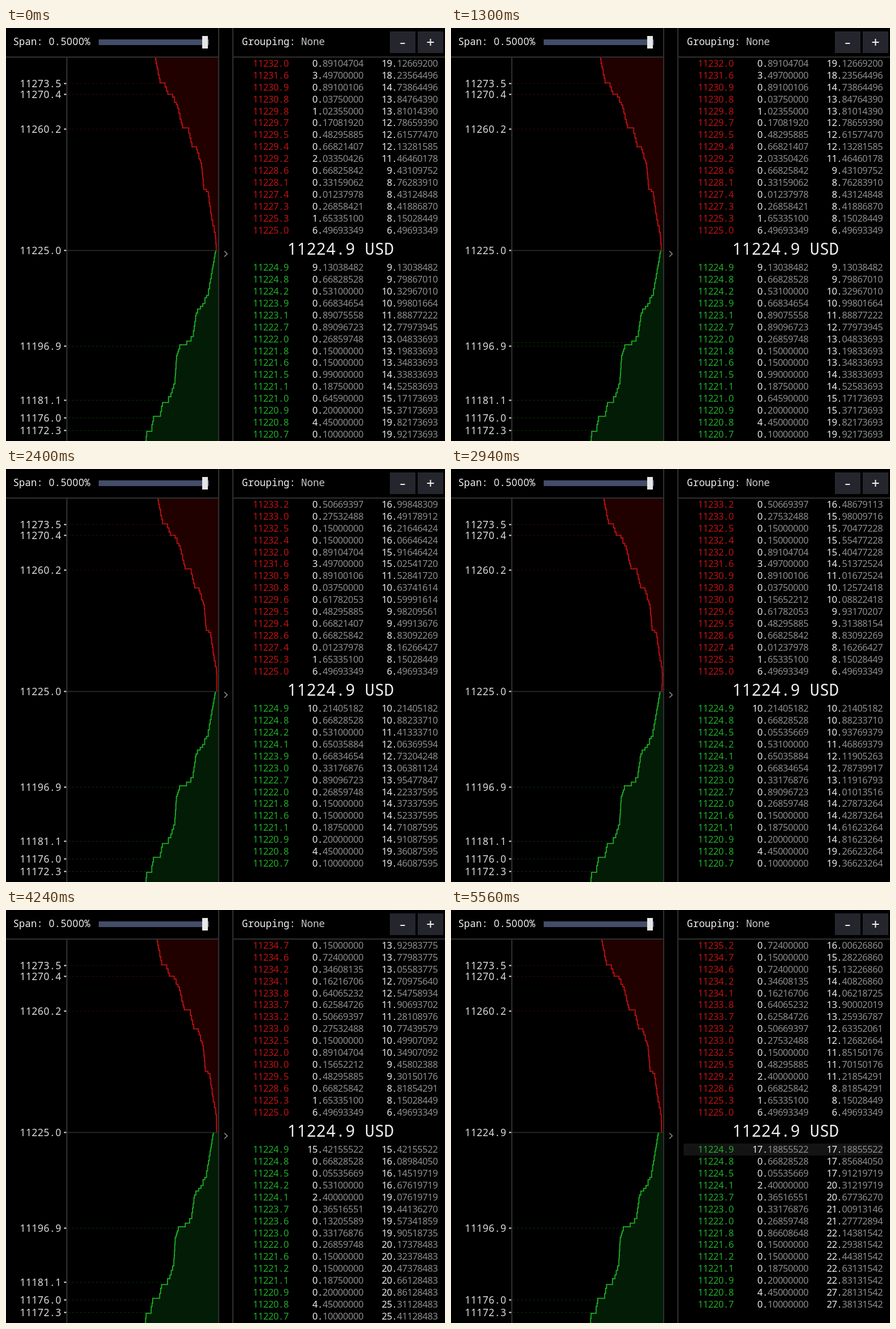
An HTML page with a canvas for the animation above (6000 ms loop, 772 by 725 pixels).

```html
<!DOCTYPE html>
<html lang="en">
<head>
<meta charset="utf-8">
<title>Order book depth</title>
<style>
  html, body { margin: 0; height: 100%; overflow: hidden; background: #000; }
  canvas { display: block; }
</style>
</head>
<body>
<canvas id="stage" width="772" height="725"></canvas>
<script>
const ctx = document.getElementById('stage').getContext('2d');
const LOOP = 6000, LAST_TRADE = 4940, MID_Y = 390.5, MID_PRICE = 11225;
const RED = '#be1212', GREEN = '#1fae27', WHITE = '#eee', GREY = '#8c8c8c', RULE = '#303030';

// Orders on show when the loop starts, nearest to the spread first.
const openingAsks = [
  [11225.0, 6.49693349], [11225.3, 1.653351], [11227.3, 0.26858421], [11227.4, 0.01237978],
  [11228.1, 0.33159062], [11228.6, 0.66825842], [11229.2, 2.03350426], [11229.4, 0.66821407],
  [11229.5, 0.48295885], [11229.7, 0.1708192], [11229.8, 1.02355], [11230.8, 0.0375],
  [11230.9, 0.89100106], [11231.6, 3.497], [11232.0, 0.89104704]
];
const openingBids = [
  [11224.9, 9.13038482], [11224.8, 0.66828528], [11224.2, 0.531], [11223.9, 0.66834654],
  [11223.1, 0.89075558], [11222.7, 0.89096723], [11222.0, 0.26859748], [11221.8, 0.15],
  [11221.6, 0.15], [11221.5, 0.99], [11221.1, 0.1875], [11221.0, 0.6459],
  [11220.9, 0.2], [11220.8, 4.45], [11220.7, 0.1]
];
const bestBidFills = [[2100, 10.21405182], [3200, 15.15305182], [4100, 15.42155522], [LAST_TRADE, 17.18855522]];
const commonSizes = [0.15, 0.0375, 0.724, 2.4];

// Depth curves as x, y; a pair on neighbouring heights is a ledge.
const askCurve = [[262.5, 52], [271.5, 96], [279, 98], [285, 115], [292, 117], [302, 138], [311.5, 177],
  [321, 179], [328, 209], [335, 211], [344, 240], [348, 284], [355, 286], [362, 335], [368, 361], [370, 390]];
const bidCurve = [[369, 390], [356, 464], [347, 485], [335, 499], [329, 540], [322, 551],
  [306, 558], [300, 577], [297, 622], [287.5, 652], [276.5, 654], [270.5, 683], [259.5, 685], [256, 705],
  [248, 707], [246, 726]];
const askDrift = [[0, 0], [0, 1300], [3, 1900], [6, 2940], [2, 3700], [4, 4880], [2.5, 5560]];
const bidDrift = [[0, 0], [0, 1900], [-1, 2940], [-4, 3700], [-4, LOOP]];

const mix = (a, b, k) => a + (b - a) * k;
const clamp = k => Math.max(0, Math.min(1, k));

// Value along a list of [value, position] pairs.
function along(pairs, position) {
  const i = pairs.findIndex(p => p[1] > position);
  if (i < 0) return pairs[pairs.length - 1][0];
  if (i === 0) return pairs[0][0];
  const [a, from] = pairs[i - 1], [b, to] = pairs[i];
  return mix(a, b, (position - from) / (to - from));
}

function seeded(seed) {
  return () => (seed = (seed * 16807) % 2147483647) / 2147483647;
}

function rect(x, y, w, h, color) {
  ctx.fillStyle = color;
  ctx.fillRect(x, y, w, h);
}

// Fixed-pitch text with plain zeros: digits come from the proportional face.
function text(value, x, baseline, size, color, pitch = size * 0.6) {
  ctx.fillStyle = color;
  ctx.textAlign = 'center';
  [...value].forEach((char, i) => {
    const family = /[\d.]/.test(char) ? '"Noto Sans", sans-serif' : '"Noto Sans Mono", monospace';
    ctx.font = `${size}px ${family}`;
    ctx.fillText(char, x + (i + 0.5) * pitch, baseline);
  });
}

function line(points, color, width = 2, dash = []) {
  ctx.beginPath();
  points.forEach(([x, y]) => ctx.lineTo(x, y));
  ctx.setLineDash(dash);
  ctx.strokeStyle = color;
  ctx.lineWidth = width;
  ctx.stroke();
}

function stairs(curve, shiftAt, seed) {
  const random = seeded(seed), points = [];
  const bottom = curve[curve.length - 1][1];
  for (let y = curve[0][1]; y < bottom;) {
    const next = Math.min(bottom, y + 3 + 9 * random());
    const x = along(curve, (y + next) / 2) + shiftAt(y);
    points.push([x, y], [x, next]);
    y = next;
  }
  return points;
}

function drawSide(points, fill, stroke) {
  ctx.beginPath();
  ctx.moveTo(373, points[0][1]);
  points.forEach(([x, y]) => ctx.lineTo(x, y));
  ctx.lineTo(373, points[points.length - 1][1]);
  ctx.fillStyle = fill;
  ctx.fill();
  line(points, stroke, 1.8);
}

function drawChart(t) {
  const askShift = along(askDrift, t), bidShift = along(bidDrift, t);
  const asks = stairs(askCurve, y => askShift * clamp((MID_Y - y) / 50), 11);
  const bids = stairs(bidCurve, y => bidShift * mix(1, 0.25, (y - MID_Y) / 335), 23);
  const priceY = price => Math.floor(MID_Y - (price - MID_PRICE) * (price > MID_PRICE ? 6.04 : 5.99)) + 0.5;
  const guide = price => {
    const ask = price > MID_PRICE, y = priceY(price);
    const edge = along(ask ? askCurve : bidCurve, y);
    line([[109, y], [edge, y]], ask ? '#2c0707' : '#072a07', 1, [4, 3]);
  };
  const label = (price, y) => {
    text(price.toFixed(1), 24.2, y + 6, 17.4, '#ddd');
    line([[102, y], [107, y]], '#ddd');
  };
  for (const price of [11273.5, 11270.4, 11260.2, 11196.9, 11181.1, 11176, 11172.3]) {
    if (price === 11181.1 && t >= LAST_TRADE) continue;
    guide(price);
    label(price, priceY(price));
  }
  if (t >= 600 && t < 1500) guide(11198);
  drawSide(asks, '#210000', RED);
  drawSide(bids, '#031c06', GREEN);
  line([[107, MID_Y], [373, MID_Y]], RULE, 1.5);
  label(t >= LAST_TRADE ? 11224.9 : MID_PRICE, MID_Y);
  line([[107, 52], [107, 725]], RULE);
}

// The book at a time: steady cancellations and new orders on both sides.
function bookAt(t) {
  const random = seeded(77);
  const pick = (from, to) => from + Math.floor(random() * (to - from));
  const amount = () => random() < 0.4 ? commonSizes[pick(0, 4)] : 0.03 + random() * 0.9;
  const asks = openingAsks.slice(), bids = openingBids.map(order => [...order]);
  const insert = (orders, price) => {
    const order = [price, amount()];
    if (!orders.some(o => o[0].toFixed(1) === price.toFixed(1))) orders.push(order);
    orders.sort((a, b) => Math.abs(a[0] - MID_PRICE) - Math.abs(b[0] - MID_PRICE));
  };
  for (let price = 11232.4; price < 11238; price += 0.1 * pick(1, 6)) asks.push([price, amount()]);
  for (let i = 0; i < 18 && t >= 1400 + i * 200; i++) {
    if (i % 4 < 3) asks.splice(pick(2, 9), 1);
    else insert(asks, 11229 + pick(0, 20) / 10);
    if (i % 2) bids.splice(pick(3, 12), 1);
    else insert(bids, 11221.1 + pick(0, 36) / 10);
  }
  for (const [time, size] of bestBidFills) if (t >= time) bids[0][1] = size;
  return { asks, bids };
}

function drawAmount(value, right, baseline) {
  const pitch = 8.95, digits = value.toFixed(8), split = digits.indexOf('.') + 1;
  const x = right - digits.length * pitch;
  text(digits.slice(0, split), x, baseline, 16.5, WHITE, pitch);
  text(digits.slice(split), x + split * pitch, baseline, 16.5, GREY, pitch);
}

function drawRows(orders, baseline, step, color) {
  let total = 0;
  for (const [price, amount] of orders.slice(0, 15)) {
    total += amount;
    text(price.toFixed(1), 434.6, baseline, 16.5, color, 8.95);
    drawAmount(amount, 628.6, baseline);
    drawAmount(total, 759.4, baseline);
    baseline += step;
  }
}

function drawTable(t) {
  const { asks, bids } = bookAt(t);
  if (t >= LAST_TRADE) rect(409, 410, 350, 21, '#141414');
  drawRows(asks, 360.8, -20.93, RED);
  drawRows(bids, 426, 20.93, GREEN);
  text('11224.9 USD', 494.6, 398, 28.4, WHITE);
}

function drawFrame() {
  rect(373, 0, 2, 725, RULE);
  rect(398, 0, 2, 725, RULE);
  rect(0, 50, 373, 2, RULE);
  rect(400, 50, 372, 2, RULE);
  text('Span: 0.5000%', 12.4, 30, 17.4, WHITE);
  rect(163, 20, 194, 10, '#434d69');
  rect(345, 14, 10, 22, '#e6e6e6');
  text('Grouping:', 415, 30, 17.4, WHITE);
  text('None', 519, 30, 17.4, '#ccc');
  rect(675, 6, 45, 38, '#25262d');
  rect(724, 6, 45, 38, '#25262d');
  rect(693.5, 26, 8, 2, WHITE);
  rect(740.5, 24, 12, 2, WHITE);
  rect(745.5, 19, 2, 12, WHITE);
  line([[384, 391.5], [389, 396.5], [384, 401.5]], '#888', 1.7);
}

function draw(now) {
  const t = now % LOOP;
  rect(0, 0, 772, 725, '#000');
  drawChart(t);
  drawTable(t);
  drawFrame();
  requestAnimationFrame(draw);
}
requestAnimationFrame(draw);
</script>
</body>
</html>
```
